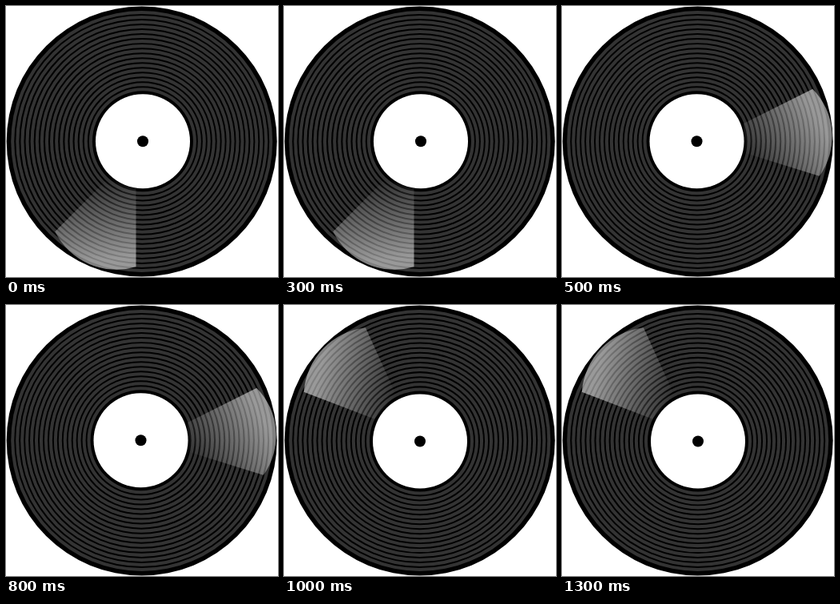
These frames come from a looping animation (340 px wide and 339 px high, 1.5 s). An HTML page with a canvas:

```html
<!DOCTYPE html>
<html>
<head>
<meta charset="utf-8">
<title>Spinning record</title>
<style>
html, body { margin: 0; width: 100%; height: 100%; overflow: hidden; background: #fff; }
canvas { display: block; }
</style>
</head>
<body>
<canvas id="stage" width="340" height="339"></canvas>
<script>
const ctx = document.getElementById('stage').getContext('2d');
const STEP = 500;
const DISC = { x: 169.7, y: 169.5, r: 169 };
const LABEL_R = 59;
const GROOVES = 17;

// Label centre, then the glare outline: inner and outer ends of its two edges.
const poses = [
  { hub: [171, 169.3], bright: [[162.5, 228], [162.5, 327]], faint: [[127, 216], [62, 282]] },
  { hub: [168.5, 169.3], bright: [[227, 147], [313, 104]], faint: [[226, 183], [322, 213]] },
  { hub: [170, 170.5], bright: [[113, 142.5], [24, 108.5]], faint: [[140, 112], [102, 29]] }
];

function disc(x, y, r, color) {
  ctx.fillStyle = color;
  ctx.beginPath();
  ctx.arc(x, y, r, 0, Math.PI * 2);
  ctx.fill();
}

function drawGrooves([hx, hy]) {
  const outer = 163.5, inner = LABEL_R + 2;
  const pitch = (outer - inner) / GROOVES;
  for (let i = 0; i < GROOVES; i++) {
    const k = i / GROOVES;
    const x = DISC.x + (hx - DISC.x) * k;
    const y = DISC.y + (hy - DISC.y) * k;
    const r = outer - i * pitch;
    disc(x, y, r, '#333');
    disc(x, y, r - pitch + 2, '#000');
  }
}

function drawGlare({ bright: [b0, b1], faint: [f0, f1] }) {
  const mid = [(b1[0] + f1[0]) / 2, (b1[1] + f1[1]) / 2];
  const dx = mid[0] - DISC.x, dy = mid[1] - DISC.y;
  const len = Math.hypot(dx, dy);
  const half = Math.hypot(b1[0] - f1[0], b1[1] - f1[1]) / 2;
  const sag = 20;
  const radius = (half * half + sag * sag) / (2 * sag);
  const back = radius - sag;
  const cx = mid[0] - dx / len * back, cy = mid[1] - dy / len * back;
  const angle = p => Math.atan2(p[1] - cy, p[0] - cx);

  const fade = ctx.createLinearGradient(
    b1[0] * 0.75 + f1[0] * 0.25, b1[1] * 0.75 + f1[1] * 0.25, f0[0], f0[1]);
  fade.addColorStop(0, 'rgba(255,255,255,0.5)');
  fade.addColorStop(1, 'rgba(255,255,255,0)');
  ctx.fillStyle = fade;
  ctx.beginPath();
  ctx.moveTo(...b0);
  ctx.lineTo(...b1);
  ctx.arc(cx, cy, radius, angle(b1), angle(f1));
  ctx.lineTo(...f0);
  ctx.closePath();
  ctx.fill();
}

function draw(pose) {
  ctx.fillStyle = '#fff';
  ctx.fillRect(0, 0, 340, 339);
  disc(DISC.x, DISC.y, DISC.r, '#000');
  drawGrooves(pose.hub);
  drawGlare(pose);
  disc(...pose.hub, LABEL_R, '#fff');
  disc(...pose.hub, 7, '#000');
}

const start = performance.now();
function tick() {
  const step = Math.floor((performance.now() - start) / STEP);
  draw(poses[step % poses.length]);
  requestAnimationFrame(tick);
}
tick();
</script>
</body>
</html>
```
